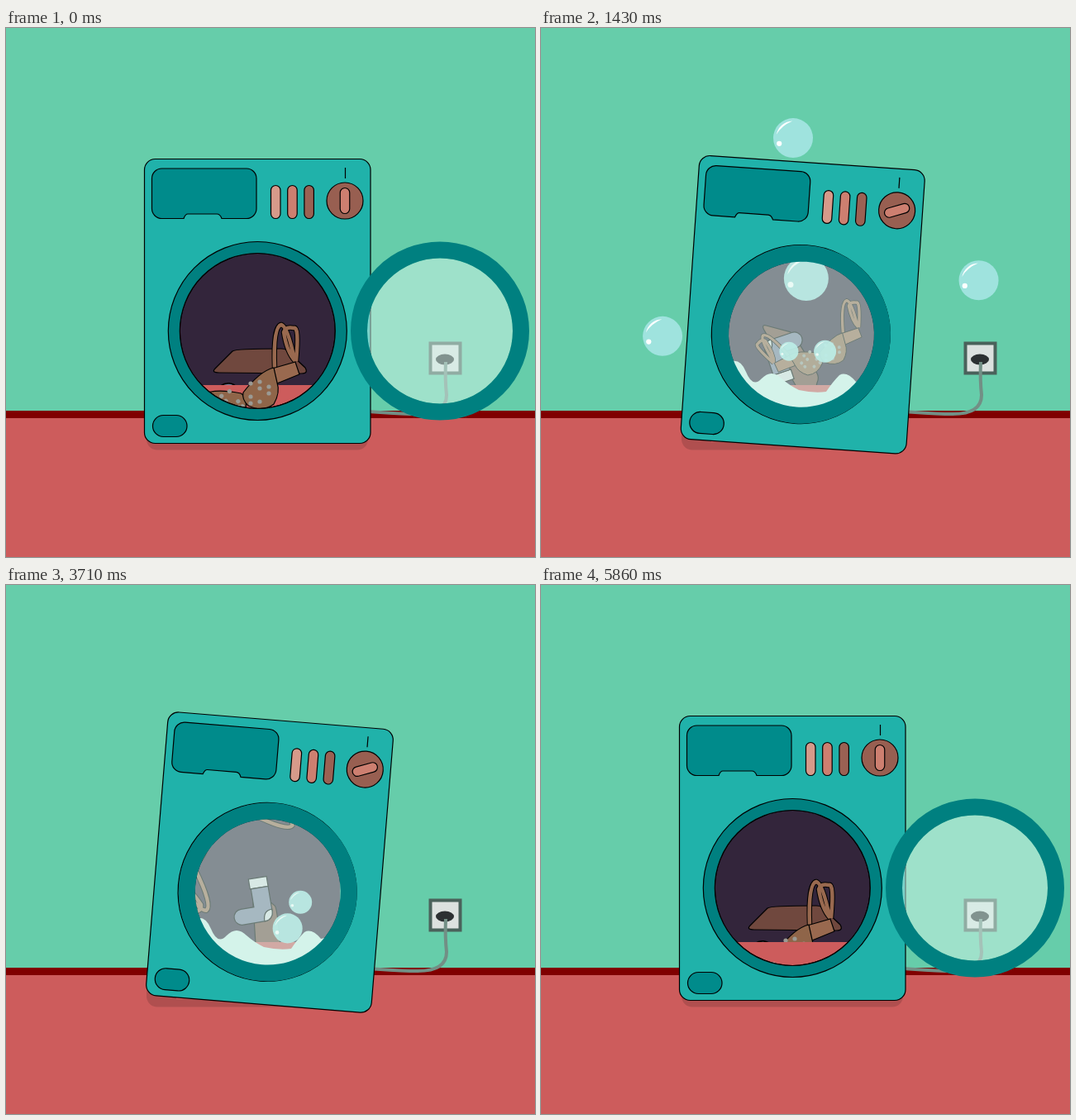
Write an HTML page with a canvas that moves like this. It is 640 by 640 pixels and loops after 6.14 s.

```html
<!DOCTYPE html>
<html>
<head>
<meta charset="utf-8">
<style>
html, body { margin: 0; height: 100%; overflow: hidden; }
canvas { display: block; width: 100vw; height: 100vh; }
</style>
</head>
<body>
<canvas id="stage" width="640" height="640"></canvas>
<script>
const g = document.getElementById('stage').getContext('2d');
const LOOP = 6140, FRAME = LOOP / 86, RAD = Math.PI / 180;
const WASHES = [[0, 2710], [3140, 4860]];

const ramp = (t, from, to) => Math.min(1, Math.max(0, (t - from) / (to - from)));
const ease = p => (1 - Math.cos(p * Math.PI)) / 2;
const pulse = (t, a, b, c, d) => ramp(t, a, b) - ramp(t, c, d);
const mix = (a, b, p) => a + (b - a) * p;

function paint(path, fill, line = '#000', width = 1.2) {
  if (fill) { g.fillStyle = fill; g.fill(path, 'evenodd'); }
  if (line) { g.strokeStyle = line; g.lineWidth = width; g.stroke(path); }
}
function group(draw, x = 0, y = 0, angle = 0, sx = 1, sy = sx) {
  g.save();
  g.translate(x, y);
  g.rotate(angle * RAD);
  g.scale(sx, sy);
  draw();
  g.restore();
}
function rect(x, y, w, h, fill) { g.fillStyle = fill; g.fillRect(x, y, w, h); }
function pill(x, y, w, h, r = Math.min(w, h) / 2) { const p = new Path2D(); p.roundRect(x, y, w, h, r); return p; }
function disc(x, y, r, ry = r) { const p = new Path2D(); p.ellipse(x, y, r, ry, 0, 0, 7); return p; }

const cord = new Path2D('M400 462C440 463 465 467 498 467Q533 467 533 444Q531 425 532 404');
const drawer = new Path2D('M188.500 170H291A12 12 0 0 1 303 182V218.500A12 12 0 0 1 291 230.500H261Q259 225 255 225H220Q217 225 215 230.500H188.500A12 12 0 0 1 176.500 218.500V182A12 12 0 0 1 188.500 170Z');
const trousersPath = new Path2D('M-55 9L-34 -12Q-31 -15 25 -15Q32 -15 36 -9L54 8Q58 15 50 15L-50 14Q-60 14 -55 9Z');
const foam = new Path2D('M205 424Q236 386 248 416Q256 436 267 424Q279 412 291 424Q300 432 312 438Q330 442 345 440Q353 428 361 420Q370 415 381 428L400 424Q385 460 304 464Q215 460 205 424Z');
const sockPath = new Path2D('M-21 -41V-19H-37A9.500 9.500 0 0 0 -37 0H-10A10 10 0 0 0 0 -10V-41Z');
const heel = new Path2D('M0 -13Q-11 -13 -11 0H-10A10 10 0 0 0 0 -10Z');
const cup = new Path2D('M37 -34Q20 -30 0 -4Q-2 4 6 12Q24 20 37 10Q45 -4 41 -16Z');
const band = new Path2D('M35 -33L63 -41L68 -26L41 -15Z');
const straps = new Path2D('M38 -34Q36 -84 46 -86Q54 -84 62 -43M64 -42Q68 -85 61 -82Q51 -84 49 -77Q53 -52 63 -42');
const body = pill(167.5, 158.5, 273.500, 344, 13);
body.addPath(disc(304.3, 366.5, 94));

// Poses are [x, y, angle, scale]. Each wash tumbles a garment from one rest
// pose to the next; bends are the amounts of a half and a whole sine wave.
const sock = {
  rests: [[248, 495, 97.5, 1.45], [310, 408, 720, 1], [247, 392, 817.5, 1.45]],
  bends: [[[-11, -53, 1, -.13], [66, 18, -18, 0]], [[0, 0, 0, 0], [49, 5, -62, -.23]]]
};
const bra = {
  rests: [[287, 445, 0, 1], [340, 498, -80, 1], [287, 445, 360, 1]],
  bends: [[[5, -79, 57, -.25], [-60, 39, 30, 0]], [[0, -155, 0, 0], [-77, -50, 41, 0]]]
};
const trousers = {
  rests: [[308, 403, 0, 1], [308, 403, 720, 1], [308, 403, 1080, 1]],
  bends: [[[0, 0, -77, 0], [0, 0, -64, 0]], [[0, 0, 0, 0], [9, 23, -90, 0]]]
};
function tumble({ rests, bends }, t) {
  const n = t < WASHES[1][0] ? 0 : 1;
  const p = ramp(t, ...WASHES[n]);
  const [half, whole] = bends[n];
  return rests[n].map((v, i) => mix(v, rests[n + 1][i], 1 - (1 - p) ** 1.5)
    + half[i] * Math.sin(Math.PI * p) + whole[i] * Math.sin(2 * Math.PI * p));
}

// start, travel x, travel y, radius
const bubbles = [
  [740, -10, -292, 24], [760, 215, -120, 24], [1066, -219, -68, 24],
  [1262, 14, -292, 27], [1330, -58, -130, 11.5], [1330, 110, -130, 13.5],
  [3598, 137, -137, 14], [3654, 160, -60, 22], [3720, -10, -292, 24], [3910, -219, -68, 24]
];
function drawBubble([start, dx, dy, r], t) {
  const p = (t - start) / 700;
  if (p < 0 || p > 1) return;
  const out = 1 - (1 - p) ** 2;
  group(() => {
    paint(disc(0, 0, 1), 'rgba(164,229,227,.92)', null);
    const shine = new Path2D();
    shine.arc(0, 0, .86, 192 * RAD, 268 * RAD);
    shine.quadraticCurveTo(-.6, -.62, -.84, -.18);
    paint(shine, '#fff', null);
    paint(disc(-.7, .28, .13), '#fff', null);
  }, 315 + dx * out, 425 + dy * out, 0, r * Math.min(1, .5 + 2 * out));
}

function drawSock() {
  paint(pill(-22, -53, 22, 12, 0), '#dcdedf');
  paint(sockPath, '#767a98');
  paint(heel, '#dcdedf');
}
function drawBraHalf() {
  paint(straps, null, '#000', 6.5);
  paint(straps, null, '#99694f', 4.5);
  paint(band, '#99694f');
  paint(cup, '#8f6549');
  for (let i = 0; i < 8; i++)
    paint(disc(9 + i % 3 * 11, 9 - (i >> 1) * 8 - i % 3 * 2, 2.6), '#9a9a94', null);
}
function drawBra() {
  group(drawBraHalf, 0, 0, 139, 1, -1);
  drawBraHalf();
}

function drawRoom() {
  rect(0, 0, 640, 464, '#66cdaa');
  rect(0, 471, 640, 169, '#cd5c5c');
  rect(0, 463, 640, 9, '#800000');
  paint(pill(513.5, 381.5, 36, 36, 0), '#dce1df', '#4a625b', 4);
  paint(disc(531, 401, 11, 6.5), '#2c3032', null);
  paint(cord, null, '#728f85', 4);
  paint(pill(170, 460, 268, 50.5, 13), 'rgba(0,0,0,.14)', null);
}

function drawContents(t) {
  const showBra = () => group(drawBra, ...tumble(bra, t));
  const [x, y, angle, size] = tumble(sock, t);
  const behind = t > 4430;
  g.save();
  g.beginPath();
  g.rect(0, 0, 640, 501);
  g.clip();
  rect(206, 255, 198, 178, '#33253b');
  group(() => paint(trousersPath, '#70483e'), ...tumble(trousers, t));
  group(drawSock, x, y + 104 * ramp(t, 5000, 5500), angle, size);
  if (behind) showBra();
  rect(206, 432, 187, 69, '#cd5c5c');
  if (!behind) showBra();
  const suds = pulse(t, 200, 1000, 1990, 2600) + pulse(t, 3140, 3700, 4900, 5640);
  group(() => paint(foam, '#d4f2ea', null), 0, 38 * (1 - ease(suds)));
  g.restore();
  for (const b of bubbles) drawBubble(b, t);
}

function drawMachine(t) {
  paint(body, '#20b2aa');
  paint(disc(304.3, 366.5, 101), null, '#008080', 14);
  for (const r of [94, 108]) paint(disc(304.3, 366.5, r));
  paint(drawer, '#008b8b');
  ['#d69a8a', '#cd7f70', '#9b6153'].forEach((c, i) => paint(pill(320.5 + i * 20.2, 190.5, 11.5, 40), c));
  paint(pill(177.5, 468.5, 41.5, 26), '#008b8b');
  paint(new Path2D('M410.500 169V182'));
  paint(disc(410, 209, 22), '#985f51');
  const knob = 70 * ease(pulse(t, 360, 640, 5140, 5500));
  group(() => paint(pill(-5.75, -15.5, 11.5, 31), '#cd7f70'), 410, 209, knob);
  const flip = 2 * pulse(t, 0, 300, 5555, 5854) - 1;
  group(() => {
    paint(disc(-110, 366.5, 88), 'rgba(214,245,236,.5)', null);
    paint(disc(-110, 366.5, 98), null, '#008080', 20);
  }, 415, 0, 0, flip, 1);
}

// Rocks left, right, hard left, then settles
function tiltAt(u) {
  const step = (from, to) => ease(ramp(u, from, to));
  return -5.5 * step(0, 90) + 14.3 * step(90, 685) - 20.8 * step(685, 1000) + 12 * step(1000, 1320);
}

function draw(now) {
  const t = Math.floor((now % LOOP + 6) / FRAME) % 86 * FRAME;
  drawRoom();
  drawContents(t);
  const tilt = tiltAt(t - (t < 2700 ? 642 : 3242));
  const [px, py] = tilt < 0 ? [203, 504] : [250, 513];
  group(() => group(() => drawMachine(t), -px, -py), px, py, tilt);
}

const begin = performance.now();
function loop() {
  draw(performance.now() - begin);
  requestAnimationFrame(loop);
}
loop();
</script>
</body>
</html>
```
